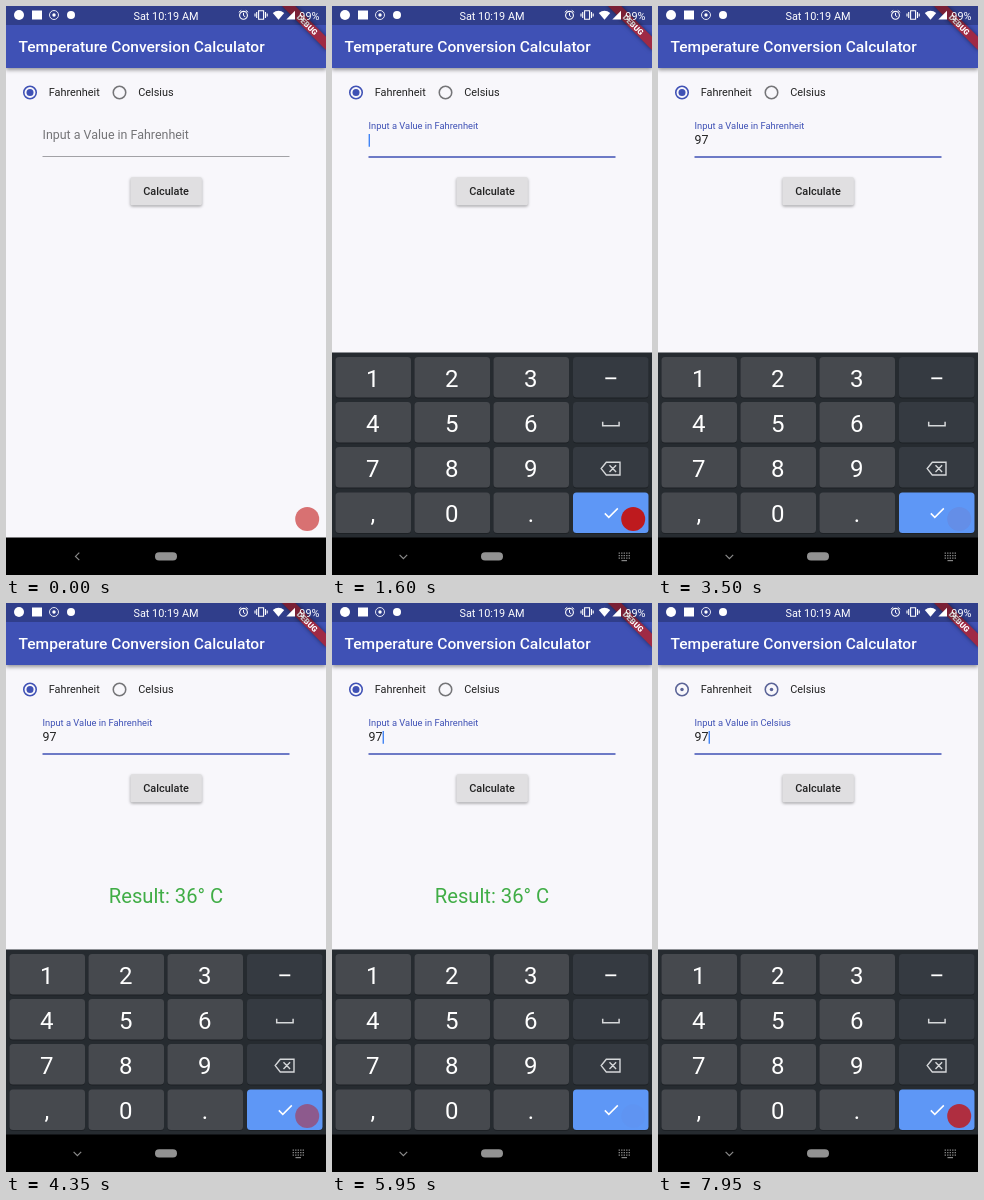
An HTML page with a canvas for the animation above (8000 ms loop, 320 by 569 pixels).

```html
<!DOCTYPE html>
<html lang="en">
<head>
<meta charset="utf-8">
<title>Temperature converter</title>
<style>
  html, body { margin: 0; width: 100%; height: 100%; overflow: hidden; background: #f8f7fb; }
  canvas { display: block; width: 320px; height: 569px; }
</style>
</head>
<body>
<canvas id="stage"></canvas>
<script>
const LOOP = 8000;
const FOCUS = 1200, TYPE_9 = 2250, TYPE_7 = 2800, CALCULATE = 4250, SWITCH = 7850;
const INDIGO = [63, 81, 181], GREY = [117, 117, 120];
const KEY_X = [3.5, 82.5, 161.5, 241], KEY_Y = [351, 396, 441, 486.5];
const KEY_LABELS = ["123", "456", "789", ",0."];

const canvas = document.getElementById("stage");
const ratio = window.devicePixelRatio || 1;
canvas.width = 320 * ratio;
canvas.height = 569 * ratio;
const ctx = canvas.getContext("2d");
ctx.scale(ratio, ratio);

const clamp = v => Math.min(1, Math.max(0, v));
const progress = (time, start, length) => clamp((time - start) / length);
const easeOut = p => 1 - (1 - p) ** 3;
const easeInOut = p => p * p * (3 - 2 * p);
const lerp = (a, b, p) => a + (b - a) * p;
const mix = (a, b, p) => `rgb(${a.map((v, i) => Math.round(lerp(v, b[i], p)))})`;
const pressed = (time, at) => time >= at - 80 && time < at + 80;

function rect(x, y, w, h, color, radius = 0) {
  ctx.fillStyle = color;
  ctx.beginPath();
  ctx.roundRect(x, y, w, h, radius);
  ctx.fill();
}

function disc(x, y, r, color) {
  ctx.fillStyle = color;
  ctx.beginPath();
  ctx.arc(x, y, r, 0, 2 * Math.PI);
  ctx.fill();
}

function ring(x, y, r, color, width) {
  ctx.strokeStyle = color;
  ctx.lineWidth = width;
  ctx.beginPath();
  ctx.arc(x, y, r, 0, 2 * Math.PI);
  ctx.stroke();
}

function line(path, color, width) {
  ctx.strokeStyle = color;
  ctx.lineWidth = width;
  ctx.stroke(new Path2D(path));
}

function shape(path, color) {
  ctx.fillStyle = color;
  ctx.fill(new Path2D(path));
}

function text(string, x, y, size, color, weight = 400, align = "left") {
  ctx.font = `${weight} ${size}px Roboto, sans-serif`;
  ctx.textAlign = align;
  ctx.fillStyle = color;
  ctx.fillText(string, x, y);
}

function withShadow(blur, offset, alpha, draw) {
  ctx.save();
  ctx.shadowColor = `rgba(0,0,0,${alpha})`;
  ctx.shadowBlur = blur * ratio;
  ctx.shadowOffsetY = offset * ratio;
  draw();
  ctx.restore();
}

function drawBanner() {
  ctx.save();
  ctx.translate(320, 0);
  ctx.rotate(Math.PI / 4);
  withShadow(4, 0, 0.5, () => rect(-31.1, 21.8, 62.2, 9.33, "#9f2a45"));
  text("DEBUG", 0, 29.3, 7.9, "#fff", 900, "center");
  ctx.restore();
}

function drawStatusBar() {
  rect(0, 0, 320, 19, "rgba(0,0,0,0.23)");
  const white = "#fff";
  disc(13, 9, 5, white);
  rect(26, 4.5, 10, 9, white);
  ring(48, 9, 4.5, "#e4e6f3", 1);
  disc(48, 9, 1.7, white);
  disc(65, 9, 4, white);
  text("Sat 10:19 AM", 160, 14, 10.9, white, 400, "center");

  ring(237.5, 9.3, 3.9, white, 1.1);
  line("M237.5 6.8v2.8l1.8 1.2M232.8 6.3l2.4-2M242.2 6.3l-2.4-2", white, 1);
  line("M252.6 4.7h5v8.6h-5zM250.7 6v6M259.5 6v6M249 7.4v3.2M261.2 7.4v3.2", white, 1.1);
  shape("M266.8 6.9Q272.5 2.4 278.2 6.9L272.5 13.7Z", white);
  shape("M280.3 13.4L289 4.7V13.4Z", white);
  text("99%", 293.3, 14, 10.9, white);
}

function drawAppBar() {
  withShadow(4, 1.5, 0.4, () => rect(0, 0, 320, 62, "#3f51b5"));
  text("Temperature Conversion Calculator", 12.5, 46.3, 15.55, "#fff", 500);
  drawBanner();
  drawStatusBar();
}

function drawRadio(x, label, selected) {
  const color = mix(GREY, INDIGO, selected);
  ring(x, 86.5, 6.25, color, 1.55);
  if (selected > 0) disc(x, 86.5, 3.5 * selected, color);
  text(label, x + 18.7, 90.4, 10.9, "#222");
}

function drawField(time) {
  const focus = easeInOut(progress(time, FOCUS, 200));
  const unit = time < SWITCH ? "Fahrenheit" : "Celsius";
  const color = mix(GREY, INDIGO, focus);
  text("Input a Value in " + unit, 36.5, lerp(132.6, 123, focus), lerp(12.44, 9.33, focus), color);
  rect(36.5, 150.2, 247, lerp(0.9, 1.6, focus), mix([134, 134, 138], INDIGO, focus));

  const value = time < TYPE_9 ? "" : time < TYPE_7 ? "9" : "97";
  text(value, 36.5, 138.4, 12.44, "#222");
  const blinkStart = [TYPE_7, TYPE_9, FOCUS].find(start => time >= start);
  if (blinkStart !== undefined && (time - blinkStart) % 1000 < 500) {
    rect(36.6 + ctx.measureText(value).width, 128, 1.4, 12.8, "#4285f4");
  }
}

function drawButton(time) {
  const down = pressed(time, CALCULATE);
  withShadow(3, 1.2, 0.35, () => rect(124.4, 171.2, 71.5, 28, down ? "#cfcfd1" : "#e0dfe1", 1.6));
  text("Calculate", 160, 189.2, 10.9, "#222", 500, "center");
}

function drawKeyboard(time) {
  const shown = easeOut(progress(time, FOCUS + 70, 230));
  if (!shown) return;
  ctx.save();
  ctx.translate(0, 185 * (1 - shown));
  rect(0, 346.5, 320, 186, "#262b30");
  KEY_Y.forEach((y, row) => KEY_X.forEach((x, column) => {
    const label = KEY_LABELS[row][column];
    const down = label === "9" && pressed(time, TYPE_9) || label === "7" && pressed(time, TYPE_7);
    const color = down ? "#63676c" : label ? "#46494e" : row === 3 ? "#5e97f6" : "#353a41";
    rect(x, y + 1, 75.5, 40.5, "#1d2125", 3.5);
    rect(x, y, 75.5, 40.5, color, 3.5);
    if (label) text(label, x + 37.3, y + 29.8, 24, "#fff", 400, "center");
  }));
  const pale = "#d6d8da";
  rect(273.3, 371.4, 11, 1.8, "#fff");
  line("M270.7 415.8v4h16.4v-4", pale, 1.5);
  line("M274.3 456.2H288V469H274.3L269.2 462.6ZM277.5 459.3l6.6 6.6M284.1 459.3l-6.6 6.6", pale, 1.4);
  line("M272.8 507.4l4 4 9-9", "#fff", 1.5);
  ctx.restore();
}

function drawNavigation(time) {
  rect(0, 531.5, 320, 38, "#000");
  rect(149, 546.3, 22, 8.2, "#929292", 4.1);
  if (time < FOCUS + 70) {
    line("M73.3 546.6l-3.8 3.8 3.8 3.8", "#8a8a8a", 1.2);
    return;
  }
  line("M67.6 548.8l3.8 3.8 3.8-3.8", "#8a8a8a", 1.2);
  for (let row = 0; row < 3; row++) {
    for (let column = 0; column < 5; column++) {
      rect(286.6 + column * 2.5, 546.4 + row * 2.5, 1.4, 1.4, "#858585");
    }
  }
  rect(289.5, 554, 5.5, 1.2, "#858585");
}

function drawRecordingDot(time) {
  ctx.globalAlpha = 0.5 + 0.5 * Math.cos((time - 275) / 1250 * 2 * Math.PI);
  disc(301.2, 513, 12, "#c21616");
  ctx.globalAlpha = 1;
}

function render(time) {
  rect(0, 0, 320, 569, "#f8f7fb");
  drawAppBar();
  const swap = progress(time, SWITCH, 200);
  drawRadio(24, "Fahrenheit", 1 - swap);
  drawRadio(113.5, "Celsius", swap);
  drawField(time);
  drawButton(time);
  if (time >= CALCULATE && time < SWITCH) {
    text("Result: 36° C", 160, 300.3, 20.2, "#40ad46", 400, "center");
  }
  drawKeyboard(time);
  drawNavigation(time);
  drawRecordingDot(time);
}

const startTime = performance.now();
function tick() {
  render((performance.now() - startTime) % LOOP);
  requestAnimationFrame(tick);
}
tick();
</script>
</body>
</html>
```
